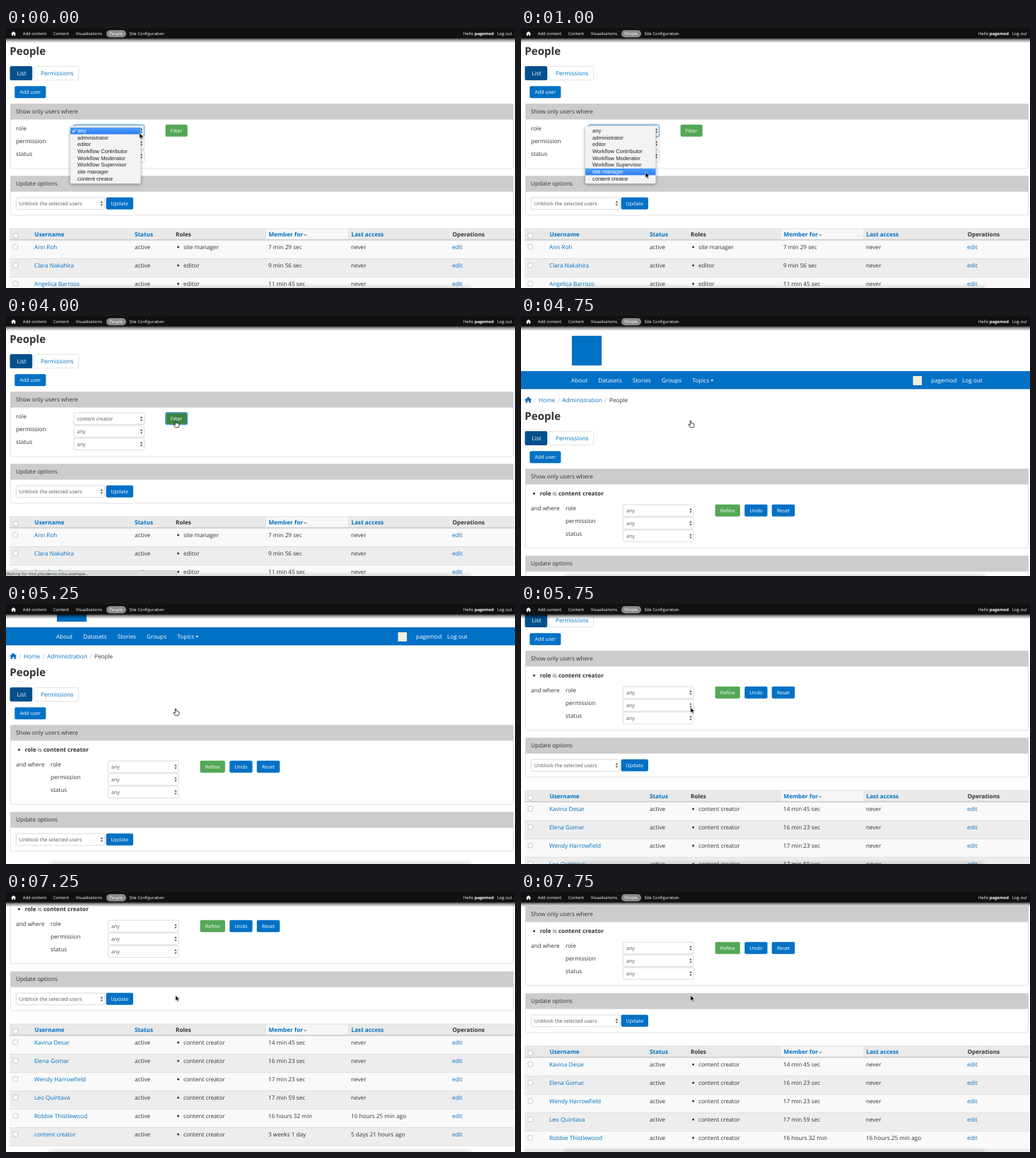
These frames come from a looping animation (720x368 px, 8 s). An HTML page:

```html
<!DOCTYPE html>
<html lang="en">
<head>
<meta charset="utf-8">
<title>People</title>
<style>
html, body { margin: 0; width: 100%; height: 100%; overflow: hidden; background: #fff; }
svg { display: block; width: 720px; height: 368px; }
text { font: 8.2px "Open Sans", sans-serif; fill: #333; text-rendering: geometricPrecision; }
.h1 { font-size: 15.1px; font-weight: 700; }
.b { font-weight: 700; }
.s { font-size: 7.1px; }
.n { font-size: 5.9px; }
.menu { font: 7.6px "Liberation Sans", Arial, sans-serif; fill: #222; }
.link { fill: #0071c5; }
.white { fill: #fff; }
.grey { fill: #555; }
.pale { fill: #bbb; }
.mid { text-anchor: middle; }
</style>
</head>
<body>
<svg id="stage" viewBox="0 0 720 368"></svg>
<script>
const LOOP = 8000;
const BLUE = '#0071c5', GREEN = '#54a756';

const text = (x, y, str, cls = '') => `<text x="${x}" y="${y}" class="${cls}">${str}</text>`;
const rect = (x, y, w, h, fill, more = '') =>
  `<rect x="${x}" y="${y}" width="${w}" height="${h}" fill="${fill}" ${more}/>`;
const path = (d, fill, more = '') => `<path d="${d}" fill="${fill}" ${more}/>`;
const group = (id, body) => `<g id="${id}">${body}</g>`;
const box = (x, y, w, h, line = '#d6d6d6') =>
  rect(x, y, w, h, '#fff', `stroke="${line}" stroke-width=".7" rx="2"`);

const button = (x, y, w, label, fill = BLUE) =>
  rect(x - .4, y - .2, w + .8, 17, fill, 'rx="2"') + text(x + w / 2, y + 10.7, label, 's white mid');

const arrows = (x, y) => path(`M${x - 1.7} ${y - 1}h3.4l-1.7 -2.4zM${x - 1.7} ${y + 1}h3.4l-1.7 2.4z`, '#444');

const select = (x, y, w, label) =>
  box(x, y, w, 16.7, '#ccc') + text(x + 4.5, y + 10.9, label, 's grey') + arrows(x + w - 4, y + 8.4);

const panel = (y, h, title) =>
  box(6.5, y, 711, h) + rect(6.2, y - .3, 711.6, 22.3, '#ccc') + text(14, y + 13.7, title);

const checkbox = y => rect(10, y, 6.6, 6.6, '#fff', 'rx="1.3" stroke="#aaa" stroke-width=".6"');

function pageTop(dy) {
  return text(5.3, 38 + dy, 'People', 'h1') +
    rect(5.5, 54 + dy, 31.7, 20, '#00508c', 'rx="2"') + text(15.5, 67 + dy, 'List', 'white') +
    box(39.3, 54.3 + dy, 63.4, 19.4) + text(49, 67 + dy, 'Permissions', 'link') +
    button(12.7, 82.5 + dy, 43.3, 'Add user');
}

function filterRows(labelX, selectX, y, first) {
  return ['role', 'permission', 'status'].map((name, i) =>
    text(labelX, y + 8 + 18 * i, name) +
    select(selectX, y + 18 * i, 99.5, i ? 'any' : first)).join('');
}

function table(y, rows) {
  const heads = [[40.5, 'Username', 1], [182, 'Status', 1], [240, 'Roles'], [371.5, 'Member for', 1],
    [488.5, 'Last access', 1], [631.5, 'Operations']];
  const body = rows.map(([name, role, age, seen], i) => {
    const top = y + 16.5 + 26 * i, base = top + 12.5;
    return rect(5, top, 714, 26, i % 2 ? '#ededed' : '#f9f9f9') + rect(5, top, 714, .6, '#d4d4d4') +
      checkbox(top + 6.2) + text(40, base, name, 'link') + text(182, base, 'active') +
      `<circle cx="243.6" cy="${base - 2.7}" r="1.5" fill="#333"/>` +
      text(251, base, role) + text(371, base, age) + text(488, base, seen) + text(631, base, 'edit', 'link');
  }).join('');
  return body + rect(5, y, 714, 16, '#e9e9e9') + rect(368, y, 116, 16, '#f6f6f6') +
    rect(5, y, 714, .6, '#d4d4d4') + rect(5, y + 15.6, 714, 1, '#c2c2c2') +
    rect(5, y + 16.5 + 26 * rows.length, 714, .6, '#d4d4d4') + checkbox(y + 7) +
    heads.map(([x, label, link]) => text(x, y + 11.3, label, link ? 'b link' : 'b')).join('') +
    path(`M420.5 ${y + 8.2}h5.6l-2.8 2.9z`, '#aaa');
}

const pageBottom = (dy, rows) =>
  panel(209.7 + dy, 55.3, 'Update options') + select(14.3, 240 + dy, 125, 'Unblock the selected users') +
  button(142, 240 + dy, 37.5, 'Update') + table(283.7 + dy, rows);

const listPage = pageTop(0) + panel(107.5, 91.3, 'Show only users where') +
  filterRows(14, 96, 137, 'content creator') +
  group('selectFocus', rect(96, 137, 99.5, 16.7, 'none',
    'rx="2" stroke="#66afe9" stroke-width=".9" style="filter:drop-shadow(0 0 1.5px #66afe9)"')) +
  button(226, 137, 30.3, 'Filter', GREEN) +
  group('pressed', button(226, 137, 30.3, 'Filter', '#3c8540')) +
  group('buttonFocus', rect(226, 136.8, 30.5, 16.8, 'none', 'rx="2" stroke="#4d9de0" stroke-width="1.5"')) +
  pageBottom(0, [
    ['Ann Roh', 'site manager', '7 min 29 sec', 'never'],
    ['Clara Nakahira', 'editor', '9 min 56 sec', 'never'],
    ['Angelica Barrozo', 'editor', '11 min 45 sec', 'never']]);

const siteHeader = rect(72, -17, 42, 42, BLUE) + rect(0, 33, 720, 25.5, BLUE) +
  [[71, 'About'], [109.3, 'Datasets'], [157.7, 'Stories'], [199, 'Groups'], [242.3, 'Topics'],
    [580, 'pagemod'], [624, 'Log out']].map(([x, s]) => text(x, 48.8, s, 'white')).join('') +
  path('M268 45.2h4.4l-2.2 2.4z', '#fff') + rect(554.5, 40, 12.5, 13, '#f4efd8') +
  path('M5 74l5.2-4.8 5.2 4.8h-1.5v3.8h-2.6v-2.8H9.1v2.8H6.5V74z', BLUE) +
  [18.3, 52, 118.2].map(x => text(x, 77, '/', 'pale')).join('') +
  text(25, 77, 'Home', 'link') + text(58.3, 77, 'Administration', 'link') + text(125, 77, 'People');

const resultPage = rect(0, -60, 720, 640, '#fff') + siteHeader + pageTop(64) +
  panel(171.5, 112, 'Show only users where') +
  '<circle cx="18.5" cy="206.3" r="1.5" fill="#333"/>' +
  text(26.7, 209, '<tspan class="b">role</tspan> is <tspan class="b">content creator</tspan>') +
  text(14, 230, 'and where') + filterRows(63, 144.5, 222, 'any') +
  button(275, 222, 34.5, 'Refine', GREEN) + button(316.7, 222, 31.5, 'Undo') + button(355.2, 222, 31.7, 'Reset') +
  pageBottom(85, [
    ['Kavina Desar', '14 min 45 sec', 'never'],
    ['Elena Gomar', '16 min 23 sec', 'never'],
    ['Wendy Harrowfield', '17 min 23 sec', 'never'],
    ['Leo Quintava', '17 min 59 sec', 'never'],
    ['Robbie Thistlewood', '16 hours 32 min', '16 hours 25 min ago'],
    ['content creator', '3 weeks 1 day', '5 days 21 hours ago']
  ].map(([name, age, seen]) => [name, 'content creator', age, seen]));

const roles = ['any', 'administrator', 'editor', 'Workflow Contributor', 'Workflow Moderator',
  'Workflow Supervisor', 'site manager', 'content creator'];
const itemY = i => 140.8 + 9.65 * i;
const menu = rect(91, 139, 99.5, 81.3, '#f3f3f3',
    'rx="2.5" style="filter:drop-shadow(0 1.5px 2.5px rgba(0,0,0,.4))"') +
  roles.map((s, i) => text(101, itemY(i) + 7.3, s, 'menu') +
    group('item' + i, rect(91, itemY(i), 99.5, 9.6, 'url(#pick)') +
      text(101, itemY(i) + 7.3, s, 'menu" style="fill:#fff'))).join('') +
  path('M94 145.6l1.5 2 2.7-4.2', 'none', 'stroke="#fff" stroke-width="1.1"');

const toolbar = rect(0, 14, 720, 7, 'url(#shade)') + rect(0, 0, 720, 14.5, '#111') +
  rect(142, 3, 28, 10.2, '#8a8a8a', 'rx="5"') +
  path('M7 8l3.6-3.3L14.2 8h-1v3h-1.8V9H9.8v2H8V8z', '#fff') +
  [[23.7, 'Add content'], [67, 'Content'], [98.7, 'Visualizations'], [146.3, 'People'],
    [174.5, 'Site Configuration'], [647, 'Hello <tspan class="b">pagemod</tspan>'], [695, 'Log out']]
    .map(([x, s]) => text(x, 10.2, s, 'n white')).join('');

const statusBar = rect(-2, 360.3, 243, 10, '#dcdcdc', 'rx="2" stroke="#aaa" stroke-width=".6"') +
  text(0, 366.8, 'Waiting for mist.plovdemo.orbu.example...', 'n');

const cursor =
  group('arrow', path('M0 0V8.2L1.9 6.5 3.2 9.4 4.6 8.8 3.3 6H5.8Z', '#000', 'stroke="#fff" stroke-width=".6"')) +
  group('hand', path('M-.7.7C-.7-.2.7-.2.7.7V3.6C1 3 2 3.1 2.1 3.9 2.6 3.4 3.5 3.6 3.5 4.4 4.2 4 4.9 4.4 4.9 5.2V7.2L4 9.8H-.6L-3.2 6.2C-3.7 5.3-2.6 4.9-2 5.5L-.7 6.6Z',
    '#fff', 'stroke="#111" stroke-width=".8"'));

const fade = (id, ...list) => `<linearGradient id="${id}" x2="0" y2="1">` + list.map(([at, color, alpha = 1]) =>
  `<stop offset="${at}" stop-color="${color}" stop-opacity="${alpha}"/>`).join('') + '</linearGradient>';

document.getElementById('stage').innerHTML =
  fade('pick', [0, '#4f9ffa'], [1, '#2f7ff2']) +
  fade('shade', [0, '#000', .85], [.5, '#000', .35], [1, '#000', 0]) +
  listPage + group('menu', menu) + group('result', group('scroll', resultPage)) + toolbar +
  rect(62, 366, 595, 20, '#000', 'opacity=".16" style="filter:blur(3px)"') +
  group('status', statusBar) + group('cursor', cursor);

// Plays [ms, value] steps, each held until the next.
function hold(id, prop, steps) {
  const frames = steps.map(([ms, value]) => ({ offset: ms / LOOP, [prop]: value, easing: 'steps(1, end)' }));
  frames.push({ offset: 1, [prop]: steps[steps.length - 1][1] });
  document.getElementById(id).animate(frames, { duration: LOOP, iterations: Infinity });
}
const show = (id, from, to) =>
  hold(id, 'opacity', [...(from ? [[0, 0]] : []), [from, 1], ...(to < LOOP ? [[to, 0]] : [])]);
const move = (id, steps) =>
  hold(id, 'transform', steps.map(([ms, x, y]) => [ms, `translate(${x}px, ${y}px)`]));

const picks = [[0, 0], [250, 1], [500, 3], [750, 5], [1000, 6], [1250, 7]];
roles.forEach((_, i) => hold('item' + i, 'opacity', picks.map(([ms, pick]) => [ms, +(pick === i)])));
hold('menu', 'opacity', [[0, 1], [1500, .4], [1750, 0]]);

show('selectFocus', 0, 2750);
show('pressed', 2500, LOOP);
show('buttonFocus', 3000, LOOP);
hold('status', 'opacity', [[0, 0], [3500, .4], [3750, .8], [4000, 1], [4500, 0]]);
show('result', 4500, LOOP);

move('scroll', [[0, 45], [5000, 32], [5250, 0], [5500, -58], [5750, -105], [6000, -138], [6250, -155],
  [6500, -162], [6750, -171], [7000, -179], [7250, -182], [7500, -170], [7750, -151]]
  .map(([ms, y]) => [ms, 0, y]));

move('cursor', [[0, 188.7, 148.5], [250, 187, 156], [500, 184, 173], [750, 180, 192], [1000, 176, 204],
  [1250, 174.7, 211], [2250, 214, 176], [2500, 240, 148], [5500, 239.7, 146]]);
show('hand', 2500, 5500);
hold('arrow', 'opacity', [[0, 1], [2500, 0], [5500, 1]]);
</script>
</body>
</html>
```
